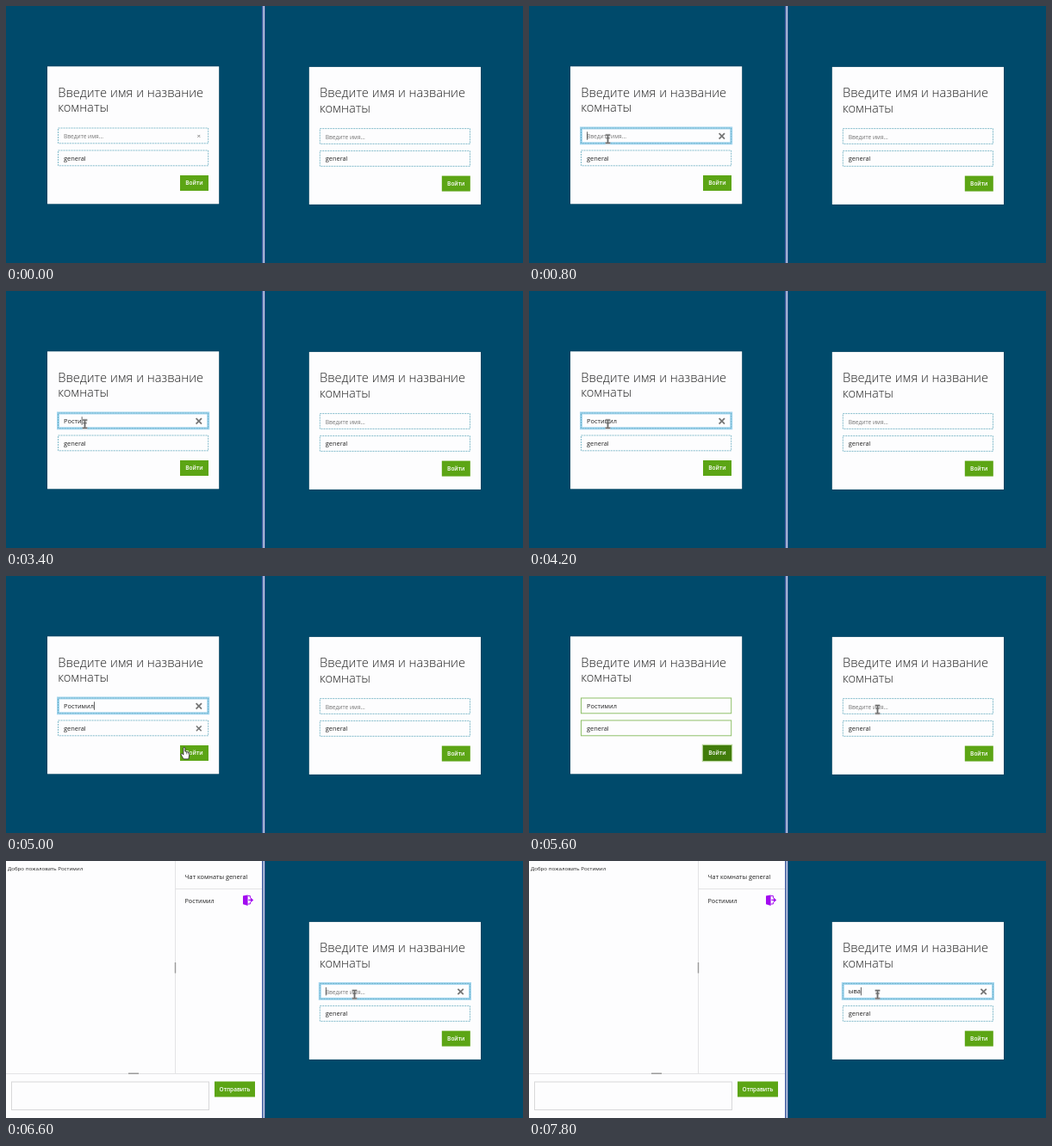
Recreate the animation shown at these times as an HTML page. Size 600 by 299 pixels, loop 8000 ms.

```html
<!DOCTYPE html>
<html lang="ru">
<head>
<meta charset="utf-8">
<title>Вход в чат</title>
<style>
  html, body { margin: 0; width: 100%; height: 100%; overflow: hidden; background: #004a6b; }
  svg { display: block; width: 100%; height: 100%; }
  text { font-family: "Open Sans", "Noto Sans", sans-serif; fill: #222; white-space: pre; }
  .title { font-size: 14.7px; font-weight: 300; }
  .hint { font-size: 6.6px; fill: #777; }
  .value { font-size: 7.4px; }
  .label { font-size: 6.5px; font-weight: 600; fill: #fff; }
</style>
</head>
<body>
<svg id="stage" viewBox="0 0 600 299"></svg>
<script>
const LOOP = 8000, STEP = 200;
const USER = 'Ростимил', OTHER = 'ыва';
const USER_KEYS = [2200, 2600, 2800, 3000, 3400, 3600, 3800, 4000];
const OTHER_KEYS = [6800, 7000, 7200];
const GREEN = '#5ca515';

const stage = document.getElementById('stage');
const pen = document.createElement('canvas').getContext('2d');

const ramp = (t, a, b) => Math.min(1, Math.max(0, (t - a) / (b - a)));
const within = (t, a, b) => t >= a && t < b;
const typed = (word, keys, t) => word.slice(0, keys.filter(k => k <= t).length);

const text = (cls, x, y, s, extra = '') => `<text class="${cls}" x="${x}" y="${y}" ${extra}>${s}</text>`;
const rect = (x, y, w, h, fill, extra = '') =>
  `<rect x="${x}" y="${y}" width="${w}" height="${h}" fill="${fill}" ${extra}/>`;
const path = (d, stroke, width = 1, fill = 'none') =>
  `<path d="${d}" stroke="${stroke}" stroke-width="${width}" fill="${fill}"/>`;
const at = (x, y, body, scale = 1) => `<g transform="translate(${x} ${y}) scale(${scale})">${body}</g>`;

function textWidth(s) {
  pen.font = '7.4px "Open Sans", "Noto Sans", sans-serif';
  return pen.measureText(s).width;
}

function field(y, { value = '', focus = 0, clear = 0, caret = false, valid = false }) {
  const frame = (stroke, extra) => rect(60.5, y, 174.2, 17.8, 'none', `stroke="${stroke}" ${extra}`);
  let out = '';
  if (focus) out += frame('#a3d6f0', `stroke-width="3" opacity="${focus}"`);
  out += valid ? frame('#8fc06a', '') : frame('#62aabe', 'stroke-width=".8" stroke-dasharray="2 1"');
  out += value ? text('value', 67, y + 11.9, value) : text('hint', 67, y + 12, 'Введите имя...');
  if (caret) {
    const x = 67.6 + textWidth(value);
    out += path(`M${x} ${y + 4.3}v9.5`, '#222', .7);
  }
  if (clear) out += at(223.8, y + 9.4, path('M-3.2-3.2L3.2 3.2M3.2-3.2L-3.2 3.2', '#767676', 1.8), clear);
  return out;
}

function form(x, y, name, room, pressed) {
  const button = pressed
    ? rect(200.8, 195.8, 35.4, 20.4, '#b5d398') + rect(202, 197, 33, 18, '#417c0b')
    : rect(202, 197, 33, 18, GREEN);
  return at(x, y,
    rect(47.2, 69.6, 200.8, 161.4, '#000', 'opacity=".1"') +
    rect(48, 70.3, 199.2, 160, '#fdfdfe') +
    text('title', 60.2, 105.8, 'Введите имя и название') +
    text('title', 60.2, 123.3, 'комнаты') +
    field(142, name) +
    field(168, { value: 'general', ...room }) +
    button +
    text('label', 218.5, 208.3, 'Войти', 'text-anchor="middle"'));
}

function exitIcon() {
  const c = '#a20cf0';
  return path('M5.5 .6H8.4V3M8.4 8V10H5.5', c, 1) +
    path('M0 .6L5.6-.6V12L0 10.2Z', 'none', 0, c) +
    path('M6.4 5.4H10.5M8.8 3.2L11.2 5.4L8.8 7.6', c, 1.3);
}

function chat() {
  return rect(0, 0, 297.5, 299, '#fdfdfe') +
    path('M196.5 0V247M197 32.5H297M0 247.5H297', '#e3e3e5') +
    path('M196.5 118V130.5M142 247.3H154', '#9a9a9a', 1.4) +
    text('', 2, 11, 'Добро пожаловать ' + USER, 'font-size="6.15"') +
    text('', 207.5, 21, 'Чат комнаты general', 'font-size="7.3"') +
    text('', 207.5, 49.3, USER, 'font-size="7.25"') +
    at(275, 40, exitIcon()) +
    rect(6.5, 257, 229, 32.5, '#fdfdfe', 'stroke="#d8d8da"') +
    rect(242, 256.5, 47, 18, GREEN) +
    text('label', 265.5, 268.2, 'Отправить', 'text-anchor="middle"');
}

const divider = () => rect(297, 0, 1.5, 299, '#4a60a8') + rect(298.5, 0, 1.5, 299, '#cdd3ea') +
  rect(300, 0, 1, 299, '#2f5590');

const beam = () => {
  const d = 'M-2.8-4.6H2.8M-2.8 4.6H2.8M0-4.6V4.6M-2-1.2H2';
  return path(d, '#c8c8c8', 3) + path(d, '#6a6a6a', 1.2);
};
const hand = () => path('M-1.6-6.4Q-.6-7.6 .4-6.4V-2.2L4.4-1.2Q5.6-.8 5.4 .8L4.4 6.6H-1.4L-4.4 1.6Q-4.6 0-3.2 .2L-1.6 1.8Z',
  '#222', .8, '#fff') + path('M2-1.6V1M3.7-1.2V1.2', '#222', .5);
const arrow = () => path('M0-5V5L2.3 3L4 6.5L5.4 5.8L3.8 2.4H7Z', '#222', .7, '#fff');

function cursor(t) {
  if (t < 200) return '';
  const go = ramp(t, 4400, 5000), back = ramp(t, 5200, 5600);
  const x = 91.5 + 116 * go + 197 * back;
  const y = 154.8 + 51.5 * go - 51 * back;
  const onButton = go === 1 && back === 0;
  const moving = within(back, .01, 1);
  return at(x, y, onButton ? hand() : moving ? arrow() : beam());
}

function draw(t) {
  const sent = t >= 5200;
  const left = {
    value: typed(USER, USER_KEYS, t),
    focus: sent ? 0 : ramp(t, 200, 600),
    clear: sent ? 0 : .45 + .55 * ramp(t, 0, 400),
    caret: within(t, 600, 1400) || within(t, 2200, 4200) || within(t, 4600, 5200),
    valid: sent
  };
  const room = { clear: within(t, 4800, 5200) ? .9 : 0, valid: sent };
  const right = {
    value: typed(OTHER, OTHER_KEYS, t),
    focus: ramp(t, 6200, 6600),
    clear: ramp(t, 6200, 6600),
    caret: within(t, 6600, 7600) || t >= 7800
  };
  stage.innerHTML = rect(0, 0, 600, 299, '#004a6b') +
    (t < 5800 ? form(0, 0, left, room, sent) : chat()) +
    divider() + form(303.8, .6, right, {}, false) + cursor(t);
}

let shown = -1;
function tick(now) {
  const t = Math.floor(now % LOOP / STEP) * STEP;
  if (t !== shown) draw(shown = t);
  requestAnimationFrame(tick);
}
draw(0);
requestAnimationFrame(tick);
</script>
</body>
</html>
```
